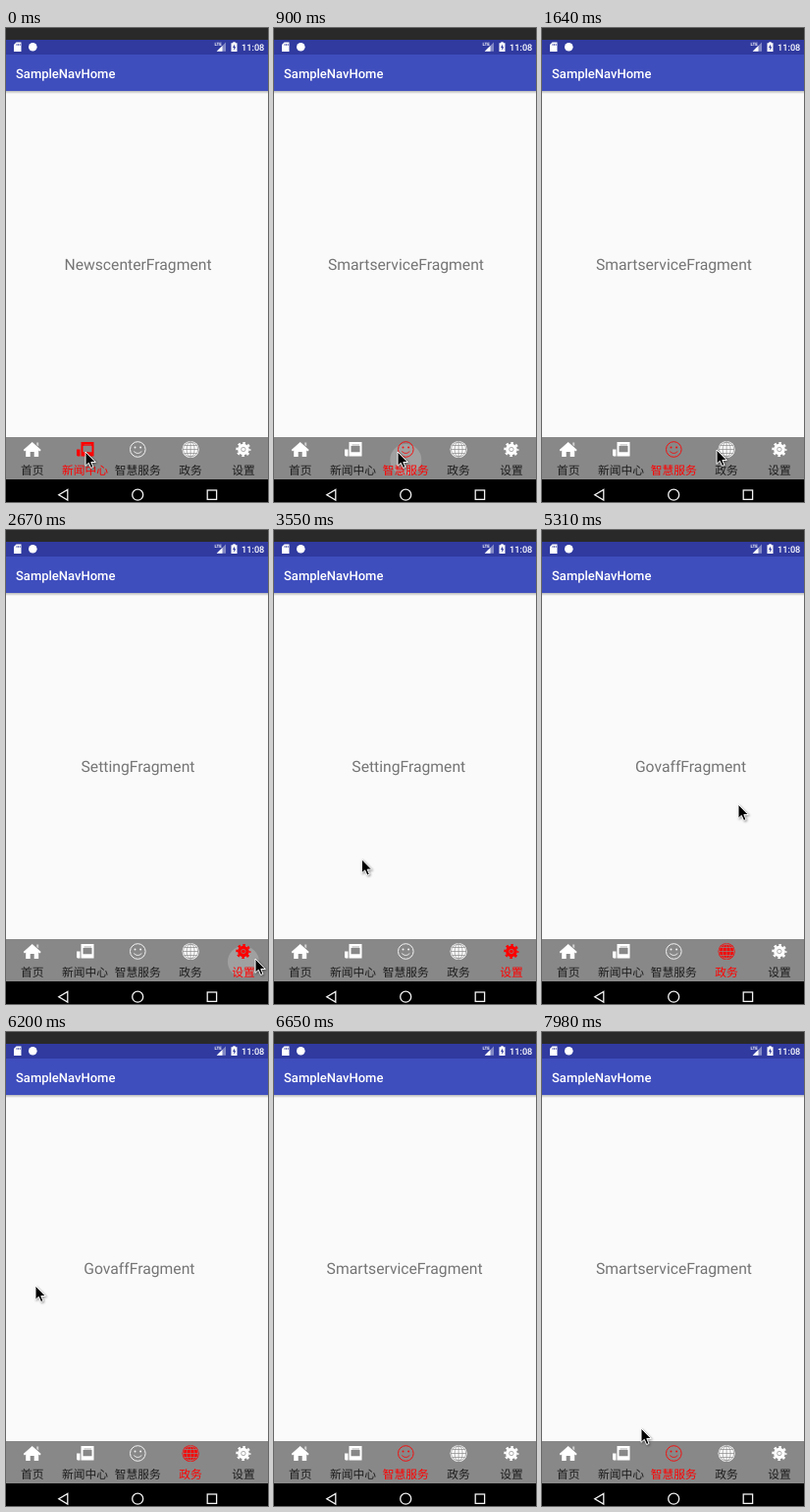
Recreate the animation shown at these times as an HTML page. Size 267 px wide and 482 px high, loop 8000 ms.

```html
<!DOCTYPE html>
<html lang="zh">
<head>
<meta charset="utf-8">
<style>
html, body { margin: 0; width: 100%; height: 100%; overflow: hidden; background: #000; }
svg { display: block; width: 267px; height: 482px; font-family: Roboto, sans-serif; text-rendering: geometricPrecision; }
.page { font-size: 15.7px; fill: #757575; text-anchor: middle; }
.tab { color: #fff; }
.tab text { font: 11.75px "Noto Sans CJK SC", "Noto Sans CJK", sans-serif; fill: #1c1c1c; text-anchor: middle; }
.tab.on { color: #f00; }
.tab.on text { fill: #f00; }
.fill { fill: currentColor; }
.line { fill: none; stroke: currentColor; }
.grid { fill: none; stroke: #888; stroke-width: .7; }
#cursor { filter: drop-shadow(1px 1px 1px #0006); }
</style>
</head>
<body>
<svg viewBox="0 0 267 482">
  <defs>
    <linearGradient id="shade" x2="0" y2="1">
      <stop stop-color="#b8b8b8"/><stop offset="1" stop-color="#fafafa"/>
    </linearGradient>
  </defs>
  <rect width="267" height="482" fill="#fafafa"/>
  <rect width="267" height="12" fill="#292929"/>
  <rect y="12" width="267" height="15" fill="#303a9f"/>
  <rect y="27" width="267" height="37" fill="#3f4ebd"/>
  <rect y="64" width="267" height="3" fill="url(#shade)"/>

  <g fill="#fff">
    <path d="M10.5 14.5H15.5V24H8V17Z"/>
    <path d="M11 16v2M12.6 16v2M14.2 16v2" stroke="#303a9f" stroke-width=".7"/>
    <circle cx="27.3" cy="19.3" r="4.3"/>
    <text x="212.5" y="17.8" font-size="4.5" font-weight="700">LTE</text>
    <path d="M224 14.5V23.8H214.7Z" opacity=".4"/>
    <path d="M220.5 18V23.8H214.7Z"/>
    <path d="M231.3 14.3h2.4v1h1.8V24h-6v-8.7h1.8Z"/>
    <path d="M233 16.5l-2 3.5h1.3v2.7l2-3.5h-1.3Z" fill="#303a9f"/>
    <text x="240" y="22.6" font-size="9.2" font-weight="500">11:08</text>
    <text x="10" y="50.6" font-size="13" font-weight="500">SampleNavHome</text>
  </g>

  <g id="pages"></g>
  <rect y="416" width="267" height="43" fill="#888"/>
  <circle id="ripple" cy="439" r="16" fill="#fff" opacity=".2"/>
  <g id="tabs"></g>
  <rect y="459" width="267" height="23"/>
  <g fill="none" stroke="#f2f2f2" stroke-width="1.3">
    <path d="M62.8 469.5V480L53.8 474.7Z"/>
    <circle cx="134.2" cy="474.7" r="5.5"/>
    <rect x="205.2" y="470" width="9.4" height="9.4"/>
  </g>
  <path id="cursor" d="M0 0V14.3L3.3 11.3 5.6 16.5 8 15.5 5.8 10.5H10.3Z" stroke="#fff"/>
</svg>
<script>
const WIDTH = 268, TICK = 147.5, LOOP = 8000;
const $ = id => document.getElementById(id);
const tabX = i => 26.7 + 53.8 * i;

const names = ['', 'Newscenter', 'Smartservice', 'Govaff', 'Setting'];
const labels = ['首页', '新闻中心', '智慧服务', '政务', '设置'];

// Icons are centred on 0,0
const icons = [
  `<path class="fill" d="M0-7.5 9 .5 7.8 2 6.5 1V7.5H2V2.5H-2V7.5H-6.5V1L-7.8 2-9 .5Z"/>
   <path class="fill" d="M4.5-7h2v4l-2-1.5Z" opacity=".6"/>`,
  `<path class="line" d="M-3-6.5H8V6H-3Z" stroke-width="2"/>
   <path class="fill" d="M-8.5 0H-5V7H-7.5L-8.5 6ZM-3 2.8H8V6H-3ZM-3-6H8V-3.5H-3Z"/>
   <path class="grid" d="M-1-4.5H6.5"/>`,
  `<g opacity=".9"><circle class="line" r="7.8"/>
   <circle class="fill" cx="-2.8" cy="-2" r="1"/><circle class="fill" cx="2.8" cy="-2" r="1"/>
   <path class="line" d="M-4 2Q0 6 4 2" stroke-width=".9"/></g>`,
  `<circle class="fill" r="8.6"/><circle class="grid" r="7.5"/>
   <path class="grid" d="M0-8V8M-8 0H8M-6.5-4H6.5M-6.5 4H6.5"/>
   <ellipse class="grid" rx="4" ry="7.5"/>`,
  `<circle class="fill" r="5.8"/>
   <circle class="line" r="6.5" stroke-width="2.2" stroke-dasharray="2.55" stroke-dashoffset="1.28"/>
   <circle class="grid" r="2.2"/>`
];

$('pages').innerHTML = names.map(n => `<text class="page" y="246">${n && n + 'Fragment'}</text>`).join('');
$('tabs').innerHTML = icons.map((icon, i) =>
  `<g class="tab" transform="translate(${tabX(i)} 428.5)">${icon}<text y="25.5">${labels[i]}</text></g>`).join('');
const pages = [...$('pages').children], tabs = [...$('tabs').children];

// Times below are in ticks. A tab is tapped every TAP ticks, then two flings go back one page each.
const TAP = 6, TRAVEL = 3, flings = [25.3, 43.5];

// Pointer stops: [arrival, x, y]
const stops = [
  [0, 81, 431], [4, 126, 431], [11, 178, 429], [16, 254, 436], [22, 111, 357],
  [26, 46, 290], [28, 225, 274], [31, 70, 277], [35, 200, 279], [39, 44, 264],
  [40, 30, 258], [48, 232, 254], [50, 46, 277], [54, 101, 403]
];

const slide = x => 1 / (1 + Math.exp(-3.5 * x));
const nudge = x => .42 * Math.exp(-x * x / .64);

function pagerAt(tick) {
  const tapped = 1 + Math.min(3, Math.floor(tick / TAP));
  return flings.reduce((pos, t) => pos - slide(tick - t), tapped) - nudge(tick - 34.9);
}

function pointerAt(tick) {
  const i = Math.max(1, stops.findIndex(s => s[0] >= tick));
  const [t0, x0, y0] = stops[i - 1], [t1, x1, y1] = stops[i];
  const start = Math.max(t0, t1 - TRAVEL);
  const f = Math.max(0, (tick - start) / (t1 - start));
  return [x0 + (x1 - x0) * f, y0 + (y1 - y0) * f];
}

function draw() {
  const tick = Math.floor(performance.now() % LOOP / TICK);
  const pos = pagerAt(tick), active = Math.round(pos);
  pages.forEach((p, i) => p.setAttribute('x', 134.5 + (i - pos) * WIDTH));
  tabs.forEach((tab, i) => tab.classList.toggle('on', i === active));

  const pressed = tick >= TAP && tick < 4 * TAP - 4 && tick % TAP < 2;
  $('ripple').style.display = pressed ? '' : 'none';
  $('ripple').setAttribute('cx', tabX(active));

  // The pointer vanishes while a fling settles
  const hidden = flings.some(t => tick > t - .6 && tick < t + 3.6);
  $('cursor').style.display = hidden ? 'none' : '';
  $('cursor').setAttribute('transform', `translate(${pointerAt(tick)})`);
  requestAnimationFrame(draw);
}
draw();
</script>
</body>
</html>
```
